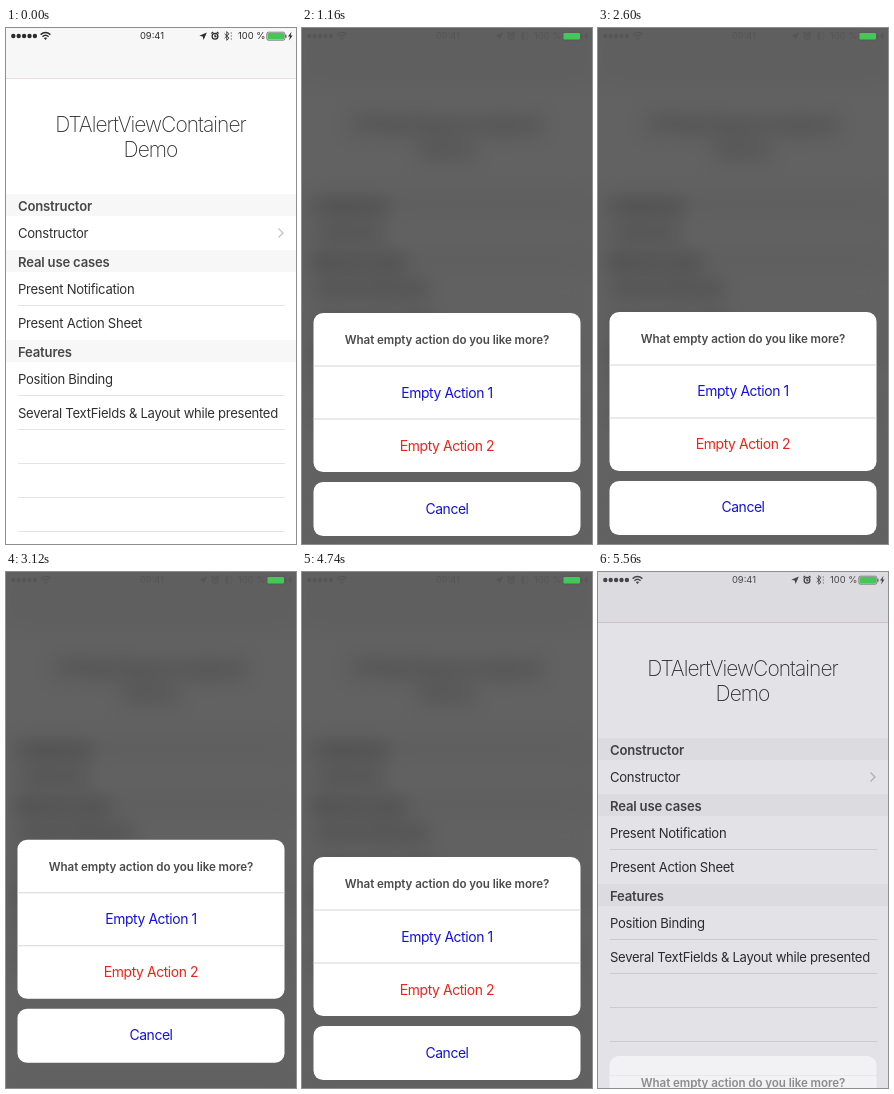
Recreate the animation shown at these times as an HTML page. Size 290 px wide and 516 px high, loop 5580 ms.

```html
<!DOCTYPE html>
<html lang="en">
<head>
<meta charset="utf-8">
<title>Action sheet</title>
<style>
  html, body { margin: 0; height: 100%; overflow: hidden; background: #fff; }
  svg { display: block; width: 290px; height: 516px; font: 400 13.1px Inter, sans-serif; letter-spacing: -.29px; }
  .title { font-size: 21px; font-weight: 200; letter-spacing: -.95px; }
  .head { font-weight: 600; letter-spacing: -.18px; fill: #484848; }
  .status { font-size: 9.4px; letter-spacing: 0; }
  .mid { text-anchor: middle; }
  .line { fill: none; stroke: #2c2c2c; }
  .action { font-size: 13.9px; letter-spacing: -.4px; }
  .question { font-size: 11.6px; font-weight: 600; letter-spacing: -.07px; }
</style>
</head>
<body>
<svg viewBox="0 0 290 516">
  <g id="page" fill="#303030">
    <path fill="#f7f7f7" d="M0 0h290v50H0z"/>
    <path fill="#eadadd" d="M0 50h290v1H0z"/>
    <g class="title mid">
      <text x="144.5" y="104">DTAlertViewContainer</text>
      <text x="144.5" y="129">Demo</text>
    </g>
    <g id="table"></g>
    <path class="line" style="stroke:#c4c4c8" stroke-width="1.3" d="M272.500 200.500l4.500 4.500-4.500 4.500"/>
  </g>
  <rect id="shade" width="290" height="516"/>
  <g id="status" class="status" fill="#2c2c2c">
    <path class="line" stroke-width="4.4" stroke-linecap="round" stroke-dasharray="0 5.4" d="M7.300 8h22"/>
    <path class="line" stroke-width="1.4" d="M34.600 6.600q4.900-4.200 9.800 0M36.400 8.700q3.100-2.700 6.200 0"/>
    <path d="M37.700 10.100q1.800-1.400 3.600 0l-1.800 1.900z"/>
    <text class="mid" x="146" y="11.4">09:41</text>
    <path d="M200.800 4.400l-3.200 7.600-.9-3.500-3.400-.8z"/>
    <g class="line" stroke-width="1.3">
      <circle cx="209" cy="8.2" r="2.9"/>
      <path d="M209 6.500v2h1.500M205.400 5.600l1.800-1.600M212.600 5.600L210.800 4"/>
    </g>
    <path class="line" stroke-width=".9" d="M218.600 5.800l4.400 4.300-2.200 2.200V3.600L223 5.800l-4.400 4.300M225.300 4.500v1M225.300 7.500v1M225.300 10.500v1"/>
    <text x="232" y="11.4">100 %</text>
    <rect class="line" stroke-width=".6" x="260.8" y="4.2" width="18" height="8" rx="1.6"/>
    <path d="M279.400 6.700h1v3h-1zM285.500 3.800l-3.500 4.800h2l-1 3.800 3.600-5h-2z"/>
  </g>
  <rect x="261.5" y="5" width="16.5" height="6.5" rx="1" fill="#45c65a"/>
  <g id="sheet" class="mid">
    <g fill="#fff">
      <rect x="11.5" width="267" height="159" rx="9.5"/>
      <rect x="11.5" y="169" width="267" height="54" rx="9.5"/>
    </g>
    <path fill="#d6d6d8" d="M11.500 52.500h267v1h-267zM11.500 105.500h267v1h-267z"/>
    <text class="question" fill="#4a4a4a" x="145" y="31">What empty action do you like more?</text>
    <g class="action" fill="#1212dc">
      <text x="145" y="84.5">Empty Action 1</text>
      <text x="145" y="137.5" fill="#ee2418">Empty Action 2</text>
      <text x="145" y="200.5">Cancel</text>
    </g>
  </g>
</svg>
<script>
const LOOP = 5580;
const $ = id => document.getElementById(id);

const header = (y, label) =>
  `<path fill="#f7f7f7" d="M0 ${y}h290v22H0z"/><text class="head" x="12" y="${y + 16.5}">${label}</text>`;
const row = (y, label) => `<text x="12" y="${y + 21.5}">${label}</text>`;
const separator = y => `<path fill="#e4e4e6" d="M12 ${y}h267v1H12z"/>`;

$('table').innerHTML =
  header(166, 'Constructor') + row(188, 'Constructor') +
  header(222, 'Real use cases') + row(244, 'Present Notification') + row(278, 'Present Action Sheet') +
  header(312, 'Features') + row(334, 'Position Binding') +
  row(368, 'Several TextFields &amp; Layout while presented') +
  [277, 367, 401, 435, 469, 503].map(separator).join('');

// [time, value] points; the sheet slides in, is dragged up twice and down once, then leaves
const sheetTop = [[10, 516], [709, 285], [1580, 285], [1890, 259], [2610, 284], [2940, 261],
  [3740, 317.5], [3820, 317.5], [4340, 285], [5230, 285], [5667, 516]];
const dimming = [[10, 0], [600, 1], [5230, 1], [5690, 0]];

function ease(points, t) {
  const i = points.findIndex(p => p[0] > t);
  if (i < 1) return points[0][1];
  const [t0, a] = points[i - 1], [t1, b] = points[i];
  return a + (b - a) * (1 - Math.cos(Math.PI * (t - t0) / (t1 - t0))) / 2;
}

function draw(now) {
  const t = now % LOOP;
  const dim = ease(dimming, t);
  const blur = 10 * Math.max(0, dim * 1.3 - .3);
  const tint = 1 - dim;
  $('page').style.filter = blur ? `blur(${blur}px)` : 'none';
  $('shade').setAttribute('fill', `rgb(${12 * tint},0,${60 * tint})`);
  $('shade').setAttribute('opacity', .615 * dim);
  $('status').setAttribute('opacity', 1 - .82 * dim);
  $('sheet').setAttribute('opacity', Math.cbrt(dim));
  $('sheet').setAttribute('transform', `translate(0 ${ease(sheetTop, t)})`);
}

const start = performance.now();
function tick() {
  draw(performance.now() - start);
  requestAnimationFrame(tick);
}
tick();
</script>
</body>
</html>
```
